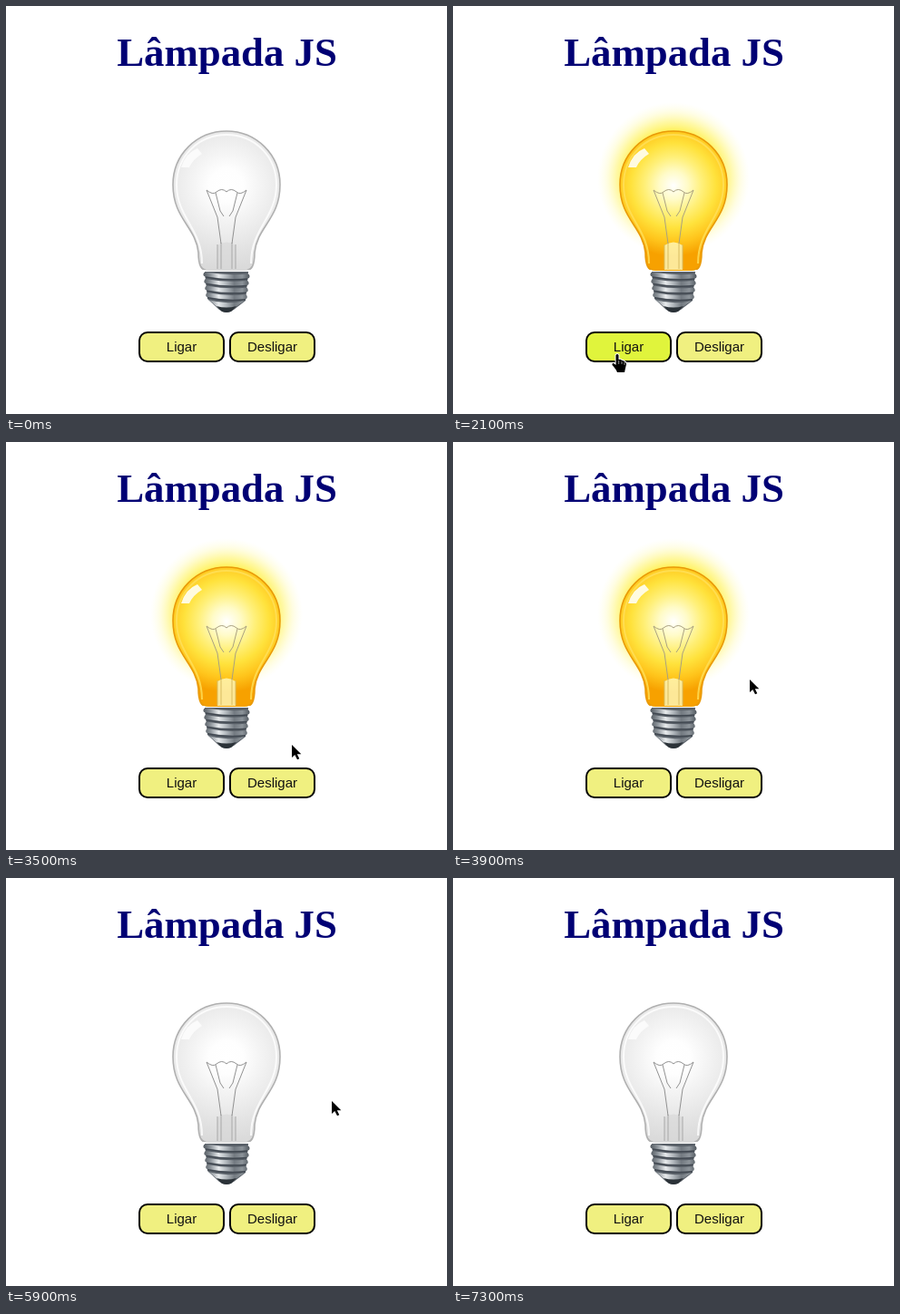
Recreate the animation shown at these times as an HTML page with a canvas. Size 486x450 px, loop 8.9 s.

```html
<!DOCTYPE html>
<html lang="pt">
<head>
<meta charset="utf-8">
<title>Lâmpada JS</title>
<style>
html, body { margin: 0; width: 100%; height: 100%; overflow: hidden; background: #fff; }
canvas { display: block; }
</style>
</head>
<body>
<canvas id="stage" width="486" height="450"></canvas>
<script>
const ctx = document.getElementById('stage').getContext('2d');
const LOOP = 8900, STEP = 100;
const AXIS = 243;

const entry = { x: 258, y: 438 };
const moves = [
  { from: 1000, until: 1700, x: 181, y: 384 },
  { from: 2200, until: 2800, x: 262, y: 388 },
  { from: 3200, until: 3900, x: 327, y: 262 },
  { from: 3900, until: 4100, x: 347, y: 259 },
  { from: 4400, until: 4700, x: 469, y: 266 },
  { from: 4800, until: 5100, x: 357, y: 251 },
  { from: 5100, until: 5400, x: 308, y: 240 },
  { from: 5400, until: 5900, x: 359, y: 246 },
  { from: 5900, until: 6300, x: 255, y: 230 },
  { from: 6500, until: 7200, x: 106, y: 426 }
];
const click = { on: 2000, off: 3000 };
const lampArea = { x: 156, y: 108, w: 194, h: 230 };
const buttons = ['Ligar', 'Desligar'].map((label, i) => ({ label, x: 146 + 100 * i, y: 359, w: 95, h: 34 }));

// Bulb parts are measured from the vertical axis; halves get mirrored.
const half = new Path2D('M0 138C-33 138-59 164-59 197C-59 235-34 243-31 272C-31 286-28 292-20 292L0 292Z');
const rim = new Path2D('M-27 284C-27 245-55 234-55 197C-55 166-31 142 0 142');
const glass = new Path2D(half);
glass.addPath(half, new DOMMatrix([-1, 0, 0, 1, 0, 0]));
const shine = new Path2D('M-50 178Q-45 162-32 157L-27 163Q-37 169-41 178Z');
const wire = new Path2D('M-22 203L-10 233L-6 262M-12 206L-7 226L-3 232');
const coil = new Path2D('M-22 203Q-15 209-11 205Q-5 200 0 205');
const stemLines = new Path2D('M-10 263V290M-6 261V290');
const arrow = new Path2D('M0 0V14L3.3 11L6 16.3L8.3 15.2L5.8 10.2H10.3Z');
const hand = new Path2D('M-1.5 1Q0-1.2 1.5 1V6Q4 5 5 7Q7.5 6.5 8 8.5Q10 8.5 10 11L8 20H0Q-1 17-5.5 12Q-6 9.5-4 10L-1.5 12Z');

const looks = {
  off: {
    glass: ['#fff', '#fefefe', '#f4f4f4', '#ebebeb', '#e2e2e2', '#dadada'],
    edge: '#b0b0b0', rim: 'rgba(255,255,255,.8)', shine: '#fbfbfb',
    stem: 'rgba(215,215,215,.6)', wire: '#909090', line: '#a8a8a8'
  },
  on: {
    glass: ['#fff', '#fffbc8', '#fff07a', '#ffe23c', '#ffc51c', '#f7a100'],
    edge: '#e99a08', rim: 'rgba(255,226,90,.8)', shine: '#fffbe0',
    stem: 'rgba(255,250,190,.8)', wire: '#a8a080', line: '#d8bc60'
  }
};
const glow = ['#fff04a', '#fff04a', '#fff04a', '#fff04a', '#fff04af5', '#fff04ae6', '#fff46a99', '#fff89040', '#fffcc000'];
const metal = ['#4e555c', '#8f969c', '#e8ebed', '#b0b6bb', '#737a81', '#8d949a', '#4e555c'];

function spread(gradient, colors) {
  colors.forEach((color, i) => gradient.addColorStop(i / (colors.length - 1), color));
  return gradient;
}

const radial = (y, r, colors) => spread(ctx.createRadialGradient(0, y, 0, 0, y, r), colors);
const across = (r, colors) => spread(ctx.createLinearGradient(-r, 0, r, 0), colors);

function fill(path, style) {
  ctx.fillStyle = style;
  ctx.fill(path);
}

function stroke(path, style, width = 1) {
  ctx.strokeStyle = style;
  ctx.lineWidth = width;
  ctx.stroke(path);
}

function mirrored(paint) {
  for (const side of [1, -1]) {
    ctx.save();
    ctx.scale(side, 1);
    paint();
    ctx.restore();
  }
}

// Sideways motion settles early while vertical motion stays even.
function pointerAt(t) {
  if (t < moves[0].from || t > moves[moves.length - 1].until) return null;
  let { x, y } = entry;
  for (const move of moves) {
    const k = Math.min(1, Math.max(0, (t - move.from) / (move.until - move.from)));
    x += (move.x - x) * (1 - (1 - k) ** 3);
    y += (move.y - y) * k;
  }
  return { x, y };
}

function isOver(area, p) {
  return p && p.x >= area.x && p.x <= area.x + area.w && p.y >= area.y && p.y <= area.y + area.h;
}

function drawText(text, x, y, font, color) {
  ctx.font = font;
  ctx.fillStyle = color;
  ctx.textAlign = 'center';
  ctx.fillText(text, x, y);
}

function drawScrew() {
  const shade = across(26, metal);
  fill(new Path2D('M-24 293H24L21 325L8 335Q0 341-8 335L-21 323Z'), '#596068');
  ctx.lineCap = 'round';
  for (let i = 0; i < 4; i++) {
    const y = 296 + i * 7.6, r = 23 - i * 0.9;
    const thread = new Path2D(`M${-r} ${y}Q0 ${y + 4} ${r} ${y + 2}`);
    stroke(thread, shade, 5);
    ctx.translate(0, 3);
    stroke(thread, 'rgba(45,52,60,.55)', 1.5);
    ctx.translate(0, -3);
  }
  ctx.lineCap = 'butt';
  fill(new Path2D('M-20 324Q0 330 20 325L10 332Q0 335-10 332Z'), shade);
  fill(new Path2D('M-11 331Q0 334 11 331L5 337Q0 339-5 337Z'), '#2b3238');
}

function drawBulb(lit) {
  const look = lit ? looks.on : looks.off;
  ctx.save();
  ctx.translate(AXIS, 0);
  if (lit) {
    ctx.fillStyle = radial(190, 84, glow);
    ctx.fillRect(-84, 106, 168, 168);
  }
  fill(glass, radial(198, lit ? 78 : 92, look.glass));

  ctx.save();
  ctx.clip(glass);
  fill(shine, look.shine);
  fill(new Path2D('M-10 264Q0 257 10 264V291H-10Z'), look.stem);
  mirrored(() => {
    stroke(rim, look.rim, 2);
    stroke(stemLines, look.line);
    stroke(wire, look.wire);
    stroke(coil, look.wire);
  });
  ctx.restore();

  ctx.save();
  ctx.beginPath();
  ctx.rect(-62, 136, 124, 155);
  ctx.clip();
  mirrored(() => stroke(new Path2D('M0 138C-33 138-59 164-59 197C-59 235-34 243-31 272C-31 286-28 292-20 292'), look.edge, 1.6));
  ctx.restore();
  drawScrew();
  ctx.restore();
}

function drawButton(button, hovered) {
  ctx.beginPath();
  ctx.roundRect(button.x + 1, button.y + 1, button.w - 2, button.h - 2, 9);
  ctx.fillStyle = hovered ? '#e0f43c' : '#f0f080';
  ctx.fill();
  ctx.strokeStyle = '#000';
  ctx.lineWidth = 2;
  ctx.stroke();
  drawText(button.label, button.x + button.w / 2, 381, '15px "Liberation Sans", Arial, sans-serif', '#111');
}

function drawPointer(p, asHand) {
  const shape = asHand ? hand : arrow;
  ctx.save();
  ctx.translate(Math.round(p.x), Math.round(p.y));
  stroke(shape, '#fff', 2);
  fill(shape, '#000');
  if (asHand) stroke(new Path2D('M1.7 7V11M5 8V11M8 9V12'), '#ccc', 0.7);
  ctx.restore();
}

function draw(now) {
  const t = Math.floor((now % LOOP) / STEP) * STEP;
  const pointer = pointerAt(t);
  const switchedOn = t >= click.on && t < click.off;
  ctx.fillStyle = '#fff';
  ctx.fillRect(0, 0, 486, 450);
  drawText('Lâmpada JS', 243.5, 66, 'bold 44.8px "Liberation Serif", "Times New Roman", serif', '#000074');
  drawBulb(switchedOn || isOver(lampArea, pointer));
  for (const button of buttons) drawButton(button, isOver(button, pointer));
  if (pointer) drawPointer(pointer, buttons.some(b => isOver(b, pointer)));
}

const start = performance.now();
function tick() {
  draw(performance.now() - start);
  requestAnimationFrame(tick);
}
tick();
</script>
</body>
</html>
```
